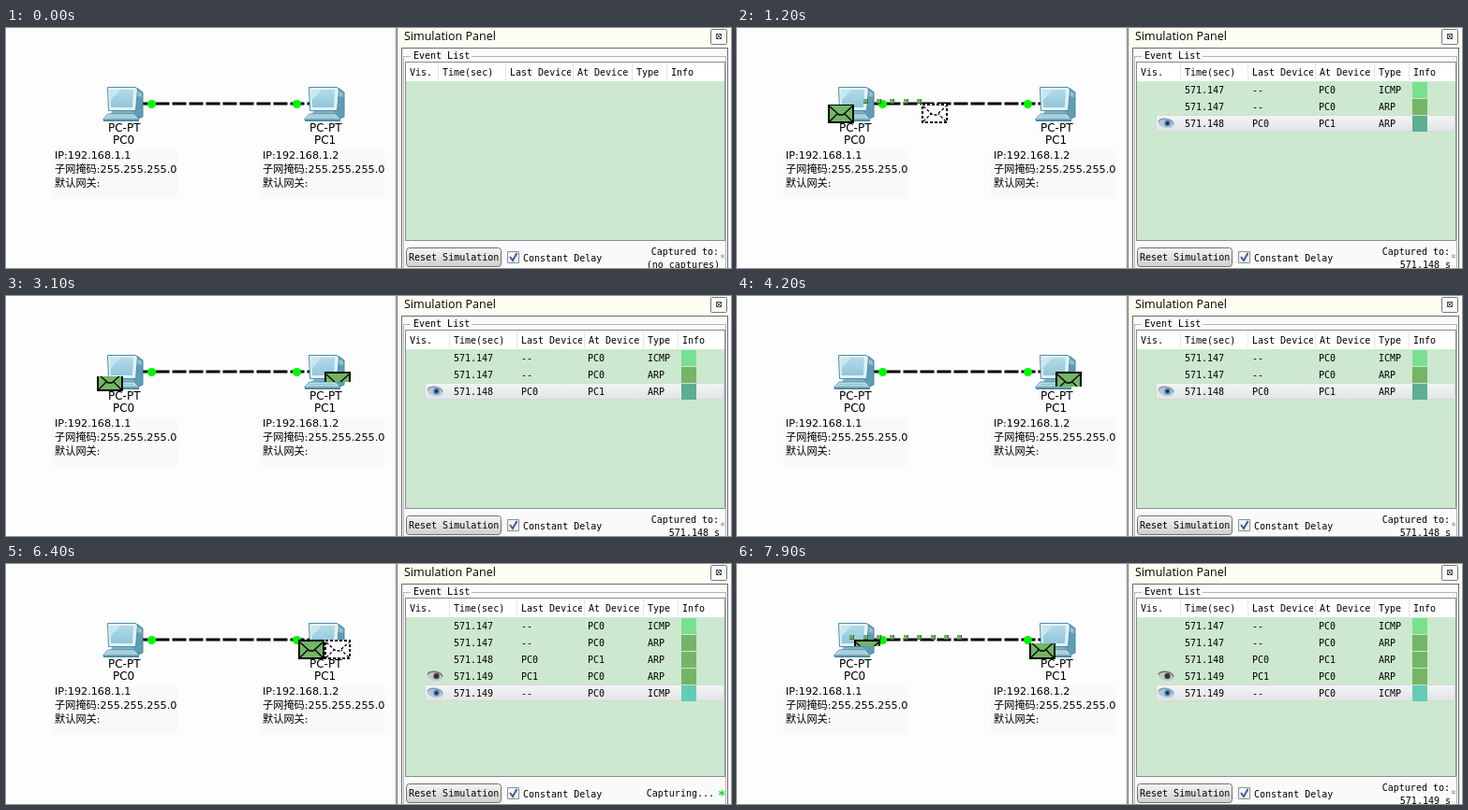
Animation of 774 by 257 pixels, one loop 8000 ms. Source, as an HTML page with a canvas:

```html
<!DOCTYPE html>
<html lang="zh">
<head>
<meta charset="utf-8">
<title>Simulation Panel</title>
<style>
html, body { margin: 0; width: 774px; height: 257px; overflow: hidden; background: #fdfdfd; }
canvas { display: block; }
</style>
</head>
<body>
<canvas id="stage" width="774" height="257"></canvas>
<script>
const ctx = document.getElementById('stage').getContext('2d');
const LOOP = 8000, STEP = 100;
const MONO = '10px "DejaVu Sans Mono", monospace';
const LABEL = '"DejaVu Sans", "Noto Sans CJK SC", sans-serif';
const ARP = '#74b566', ICMP = '#78e090';
const ENV_W = 28, ENV_H = 21, ENV_Y = 81, ROW_MS = 207;
const DOT_GAP = 14.4, DOT_COUNT = 15, DOT_X = 122.2, ERASE = 0.144;

function box(x, y, w, h, color) {
  ctx.fillStyle = color;
  ctx.fillRect(x, y, w, h);
}

function text(str, x, y, font = MONO, color = '#000') {
  ctx.font = font;
  ctx.fillStyle = color;
  ctx.fillText(str, x, y);
}

function poly(points, fill, stroke) {
  ctx.beginPath();
  points.forEach(([x, y]) => ctx.lineTo(x, y));
  ctx.closePath();
  if (fill) { ctx.fillStyle = fill; ctx.fill(); }
  if (stroke) { ctx.strokeStyle = stroke; ctx.lineWidth = 1; ctx.stroke(); }
}

function disc(x, y, r, color) {
  ctx.fillStyle = color;
  ctx.beginPath();
  ctx.arc(x, y, r, 0, Math.PI * 2);
  ctx.fill();
}

function roundBox(x, y, w, h, r, fill, stroke) {
  ctx.beginPath();
  ctx.roundRect(x, y, w, h, r);
  ctx.fillStyle = fill;
  ctx.fill();
  ctx.strokeStyle = stroke;
  ctx.lineWidth = 1;
  ctx.stroke();
}

function shade(y, h, top, bottom) {
  const g = ctx.createLinearGradient(0, y, 0, y + h);
  g.addColorStop(0, top);
  g.addColorStop(1, bottom);
  return g;
}

function computer(dx, name) {
  ctx.save();
  ctx.translate(dx, 0);
  poly([[137, 64], [141, 65], [146, 69], [146, 95], [139, 98], [134, 90]], '#5f9db5', '#4888a2');
  poly([[140, 67], [145, 70], [145, 74], [140, 73]], '#93c0d0');
  poly([[115, 87], [133, 87], [138, 93], [111, 93]], '#7fb2c5');
  poly([[108.5, 63.5], [138.5, 63.5], [140.5, 66], [138.5, 88.5], [109.5, 88.5]], '#e3f1f6', '#4b8fa9');
  poly([[111, 66], [136, 66], [135, 85], [112, 85]], shade(66, 19, '#b3dbe9', '#90c6da'));
  poly([[111, 66], [122, 66], [112, 77]], '#c9e7f0');
  poly([[109, 92], [137, 92], [142, 98], [103.5, 98]], '#c5e0e9', '#5797af');
  box(104, 98, 38, 2, '#4b8ca6');
  ctx.strokeStyle = '#8fbccb';
  ctx.beginPath();
  ctx.moveTo(109, 94.5); ctx.lineTo(137, 94.5);
  ctx.moveTo(107, 96.5); ctx.lineTo(139, 96.5);
  ctx.stroke();
  text('PC-PT', 109, 111, '12px ' + LABEL);
  text(name, 114, 124, '12px ' + LABEL);
  ctx.restore();
}

function address(x, ip) {
  box(x - 3, 130, 134, 52, '#f9f9fa');
  ['IP:' + ip, '子网掩码:255.255.255.0', '默认网关:'].forEach((line, i) =>
    text(line, x, 140 + i * 15, '11.2px ' + LABEL));
}

function network() {
  address(52, '192.168.1.1');
  address(274, '192.168.1.2');
  ctx.strokeStyle = '#000';
  ctx.lineWidth = 3;
  ctx.setLineDash([15, 3]);
  ctx.beginPath();
  ctx.moveTo(123.5, 81);
  ctx.lineTo(330, 81);
  ctx.stroke();
  ctx.setLineDash([]);
  computer(0, 'PC0');
  computer(215, 'PC1');
  disc(155.5, 81.5, 4.5, '#00f800');
  disc(310.5, 81.5, 4.5, '#00f800');
}

// Draws only the rows from first up to last.
function envelope(x, first = 0, last = ENV_H, dashed = false) {
  if (last <= first) return;
  ctx.save();
  ctx.beginPath();
  ctx.rect(x, ENV_Y + first, ENV_W, last - first);
  ctx.clip();
  ctx.translate(x, ENV_Y);
  box(0, 0, ENV_W, ENV_H, dashed ? '#fdfdfd' : ARP);
  ctx.strokeStyle = '#000';
  if (dashed) ctx.setLineDash([3, 2]);
  ctx.lineWidth = 2;
  ctx.strokeRect(1, 1, ENV_W - 2, ENV_H - 2);
  ctx.lineWidth = 1.3;
  ctx.beginPath();
  ctx.moveTo(2, 3); ctx.lineTo(12, 12); ctx.lineTo(16, 12); ctx.lineTo(26, 3);
  ctx.moveTo(2, 19); ctx.lineTo(10, 11);
  ctx.moveTo(26, 19); ctx.lineTo(18, 11);
  ctx.stroke();
  ctx.restore();
}

function dot(x) {
  const left = Math.round(x) - 2;
  box(left, 76, 5, 5, '#3f6d38');
  box(left, 76, 4, 4, '#6fae62');
}

// One packet trip: the sender wipes away while the ghost travels,
// then the receiver fills in row by row.
function trip(age, home, from, to, speed, eraseFrom) {
  const dir = Math.sign(to - from);
  const head = from + dir * age / STEP * speed;
  const arrived = (to - head) * dir <= 0;
  const arrival = Math.floor(Math.abs(to - from) / speed) * STEP;
  const rows = Math.min(ENV_H, Math.floor(age / ROW_MS));

  for (let i = dir > 0 ? 1 : 0; i < DOT_COUNT; i++) {
    const x = DOT_X + i * DOT_GAP;
    const reached = arrived || (head - x) * dir > 0;
    const kept = (x - eraseFrom) * dir > age * ERASE;
    if (reached && kept) dot(x);
  }
  if (age < 3400) envelope(home, Math.floor(Math.min(age, arrival) / ROW_MS));
  if (arrived) envelope(to, 0, rows);
  else envelope(Math.round(head), 0, ENV_H, true);
}

function eye(y, blue) {
  ctx.fillStyle = blue ? '#b4c8d9' : '#c6c9c8';
  ctx.beginPath();
  ctx.ellipse(458, y, 8.5, 5, 0.2, 0, Math.PI * 2);
  ctx.fill();
  ctx.strokeStyle = blue ? '#7c9cb9' : '#77706e';
  ctx.lineWidth = 1.5;
  ctx.beginPath();
  ctx.ellipse(458, y, 8, 4.5, 0.2, Math.PI, Math.PI * 1.95);
  ctx.stroke();
  disc(459.5, y, 3.2, blue ? '#4a7aa8' : '#4d4645');
  disc(459.5, y, 1.5, '#1c2836');
}

function clipped(str, x, y, width) {
  ctx.save();
  ctx.beginPath();
  ctx.rect(x, y - 12, width, 16);
  ctx.clip();
  text(str, x, y);
  ctx.restore();
}

function frame() {
  box(418, 0, 356, 257, '#fafafa');
  box(418, 0, 356, 20, '#fdfdf2');
  ['#dcdcdc', '#b4b4b4', '#787878'].forEach((color, i) => box(415 + i, 0, 1, 257, color));
  text('Simulation Panel', 425, 13, '12.5px "Open Sans", "Noto Sans", sans-serif');
  roundBox(752.5, 1.5, 17, 16, 1, '#fafafa', '#777');
  ctx.strokeStyle = '#555';
  ctx.strokeRect(758.5, 6.5, 5, 5);
  ctx.beginPath();
  ctx.moveTo(758, 6); ctx.lineTo(764, 12);
  ctx.moveTo(764, 6); ctx.lineTo(758, 12);
  ctx.stroke();

  ctx.strokeStyle = '#6c6c6c';
  ctx.strokeRect(422.5, 21.5, 348, 250);
  ctx.strokeStyle = '#b4b4b4';
  ctx.strokeRect(424.5, 30.5, 344, 240);
  box(432, 26, 65, 9, '#fafafa');
  text('Event List', 435, 33);
  box(426, 36, 342, 192, '#858b91');
  box(427, 37, 340, 20, '#fff');
  box(427, 57, 340, 170, '#cce8cf');
}

function bottomBar(status, busy) {
  roundBox(427.5, 235.5, 101, 20, 3, shade(236, 20, '#f4f4f4', '#cdcdcd'), '#707070');
  text('Reset Simulation', 430, 249);
  roundBox(535.5, 239.5, 12, 12, 0, '#f4f4f4', '#8a8f94');
  ctx.strokeStyle = '#3c5a9c';
  ctx.lineWidth = 2;
  ctx.beginPath();
  ctx.moveTo(538, 245); ctx.lineTo(541, 249); ctx.lineTo(545.5, 241);
  ctx.stroke();
  text('Constant Delay', 552, 250);
  ctx.textAlign = 'right';
  if (busy) text('Capturing...', 756, 249);
  else {
    text('Captured to:', 761, 243);
    text(status, 762, 257);
  }
  ctx.textAlign = 'left';
  if (busy) text('*', 760, 252, 'bold 14px "DejaVu Sans Mono", monospace', '#00e800');
  else text('*', 762, 250, MONO, '#888');
}

function panel(t) {
  const started = t >= 800, second = t >= 6400;
  const shift = started ? 12 : 0;
  frame();
  const cols = [[431, 'Vis.'], [466 + shift, 'Time(sec)'], [538 + shift, 'Last Device'],
    [610 + shift, 'At Device'], [673 + shift, 'Type'], [710 + shift, 'Info']];
  cols.forEach(([x, name], i) => {
    clipped(name, x, 51, 65);
    if (i) box(x - 5, 38, 1, 18, '#e6e6e6');
  });

  const rows = [
    ['571.147', '--', 'PC0', 'ICMP', ICMP],
    ['571.147', '--', 'PC0', 'ARP', ARP],
    ['571.148', 'PC0', 'PC1', 'ARP', second ? ARP : '#5dae92'],
    ['571.149', 'PC1', 'PC0', 'ARP', ARP],
    ['571.149', '--', 'PC0', 'ICMP', '#62cdb4']
  ].slice(0, !started ? 0 : second ? 5 : 3);
  rows.forEach(([time, last, at, type, color], i) => {
    const y = 57 + i * 18;
    if (i === rows.length - 1) {
      roundBox(447.5, y + 0.5, 319, 17, 2, shade(y, 18, '#f4f6f6', '#e0e4e4'), '#d5d9d8');
    }
    text(time, 478, y + 13);
    text(last, 550, y + 13);
    text(at, 621, y + 13);
    text(type, 685, y + 13);
    box(721, y + 1, 16, 17, color);
    if (second ? i > 2 : i === 2) eye(y + 9, i !== 3);
  });

  const status = !started ? '(no captures)' : second ? '571.149 s' : '571.148 s';
  bottomBar(status, second && t < 7400);
}

function draw(now) {
  const t = Math.floor(now % LOOP / STEP) * STEP;
  box(0, 0, 774, 257, '#fdfdfd');
  network();
  if (t >= 6400) trip(t - 6400, 312, 340, 125, 22, 460);
  else if (t >= 800) trip(t - 800, 97, 121, 340, 19, -4);
  panel(t);
}

const start = performance.now();
function tick() {
  draw(performance.now() - start);
  requestAnimationFrame(tick);
}
tick();
</script>
</body>
</html>
```
